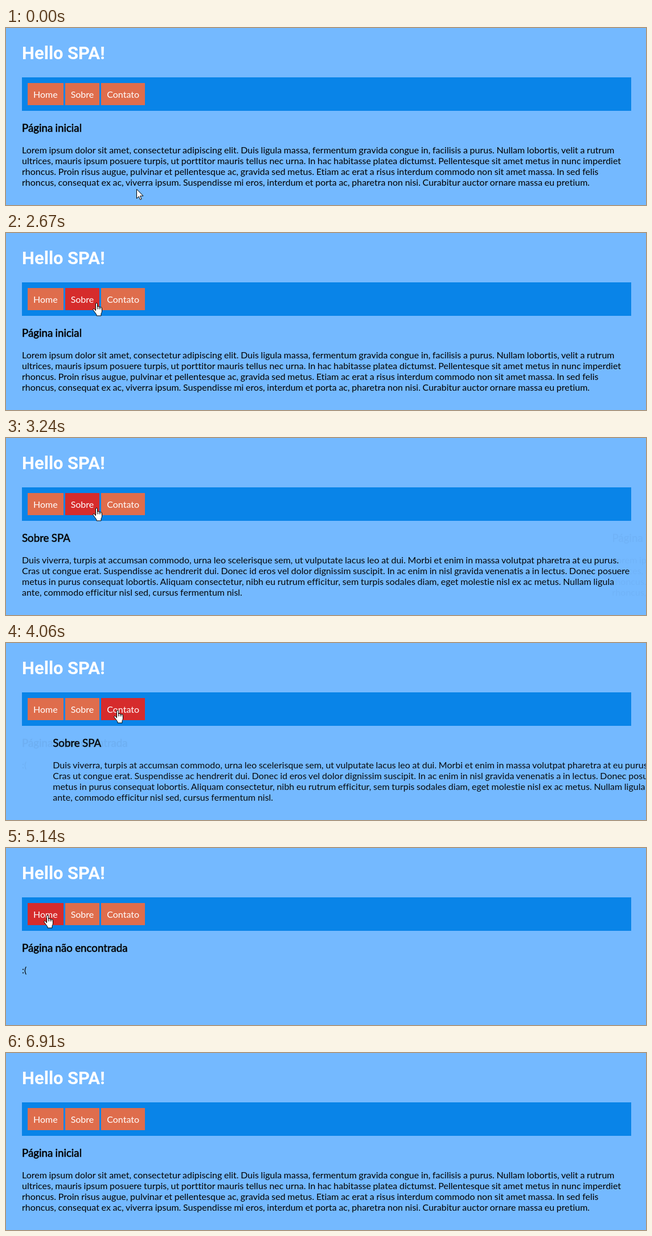
Animation of 1124 by 312 pixels, one loop 6.94 s. Source, as an HTML page:

```html
<!DOCTYPE html>
<html lang="pt-BR">
<head>
<meta charset="utf-8">
<title>Hello SPA!</title>
<style>
  :root { --loop: 6940ms; --link: #df6d4c; --hover: #d62c2c; }
  html, body { margin: 0; width: 100%; height: 100%; overflow: hidden; }
  body {
    position: relative; background: #74b9ff; color: #000;
    font: 16px Lato, sans-serif; font-variant-ligatures: none; word-spacing: -.027em;
  }

  h1 {
    position: absolute; left: 28px; top: 24px; margin: 0;
    color: #fff; font: 700 31px/41px Roboto, sans-serif; white-space: nowrap;
  }

  nav {
    position: absolute; left: 28px; top: 87px; width: 1070px; height: 59px;
    display: flex; gap: 3px; box-sizing: border-box; padding: 10px;
    background: #0984e8; white-space: nowrap;
  }
  nav span {
    padding: 10px; line-height: 19px; color: #fff;
    background: var(--link); animation: var(--loop) linear infinite;
  }
  .home { animation-name: home; }
  .about { animation-name: about; }
  .contact { animation-name: contact; }

  section {
    position: absolute; left: 28px; top: 146px; white-space: nowrap;
    animation: var(--loop) ease infinite;
  }
  .wide { width: 1070px; }
  #start { animation-name: start; }
  #info { animation-name: info; }
  #missing { animation-name: missing; }
  h3 { margin: 18.72px 0; font-size: 18.72px; font-weight: 400; -webkit-text-stroke: .55px; }
  p { margin: 0; line-height: 19px; }

  #cursor {
    position: absolute; left: 0; top: 0; width: 24px; height: 24px; overflow: visible;
    fill: #fff; stroke: #000; stroke-linejoin: round; stroke-linecap: round;
    animation: move var(--loop) ease-in-out infinite;
  }
  #arrow { animation: arrow var(--loop) step-end infinite; }
  #hand { animation: hand var(--loop) step-end infinite; }

  /* Pages: the old one slides out by its own width, the new one fades in */
  @keyframes start {
    0%, 38.876% { opacity: 1; transform: none; }
    48.963% { opacity: 0; transform: translateX(100%); }
    48.964%, 87.363% { opacity: 0; transform: none; }
    97.45%, 100% { opacity: 1; transform: none; }
  }
  @keyframes info {
    0%, 38.876% { opacity: 0; transform: none; }
    48.963%, 57.839% { opacity: 1; transform: none; }
    67.925%, 100% { opacity: 0; transform: translateX(100%); }
  }
  @keyframes missing {
    0%, 57.839% { opacity: 0; transform: none; }
    67.925%, 87.363% { opacity: 1; transform: none; }
    97.45%, 100% { opacity: 0; transform: translateX(100%); }
  }

  /* Menu hover */
  @keyframes home {
    0%, 17.867%, 28.818%, 71.182%, 97.406%, 100% { background: var(--link); }
    20.749%, 25.937%, 74.063%, 94.524% { background: var(--hover); }
  }
  @keyframes about {
    0%, 26.153%, 52.522%, 69.597%, 73%, 100% { background: var(--link); }
    29.035%, 49.64% { background: var(--hover); }
    71% { background: #db4d3c; }
  }
  @keyframes contact {
    0%, 49.784%, 72.262%, 100% { background: var(--link); }
    52.666%, 69.38% { background: var(--hover); }
  }

  /* Pointer */
  @keyframes move {
    0%, 7.637% { transform: translate(229px, 284px); }
    17.651% { transform: translate(98px, 137px); animation-timing-function: ease-out; }
    20.893%, 23.991% { transform: translate(84px, 124px); animation-timing-function: ease-in; }
    25.648% { transform: translate(99px, 134px); animation-timing-function: ease-out; }
    29.395%, 48.631% { transform: translate(158px, 123px); }
    51.873%, 67.795% { transform: translate(195px, 118px); }
    73.847%, 91.931% { transform: translate(72px, 118px); }
    98.703%, 100% { transform: translate(110px, 290px); }
  }
  @keyframes arrow {
    0% { visibility: visible; }
    17.75% { visibility: hidden; }
    94.524% { visibility: visible; }
    99.424%, 100% { visibility: hidden; }
  }
  @keyframes hand {
    0% { visibility: hidden; }
    17.75% { visibility: visible; }
    94.524%, 100% { visibility: hidden; }
  }
</style>
</head>
<body>
  <h1>Hello SPA!</h1>
  <nav>
    <span class="home">Home</span>
    <span class="about">Sobre</span>
    <span class="contact">Contato</span>
  </nav>

  <section id="missing">
    <h3>Página não encontrada</h3>
    <p>:(</p>
  </section>
  <section id="info" class="wide">
    <h3>Sobre SPA</h3>
    <p>Duis viverra, turpis at accumsan commodo, urna leo scelerisque sem, ut vulputate lacus leo at dui. Morbi et enim in massa volutpat pharetra at eu purus.<br>
    Cras ut congue erat. Suspendisse ac hendrerit dui. Donec id eros vel dolor dignissim suscipit. In ac enim in nisl gravida venenatis a in lectus. Donec posuere<br>
    metus in purus consequat lobortis. Aliquam consectetur, nibh eu rutrum efficitur, sem turpis sodales diam, eget molestie nisl ex ac metus. Nullam ligula<br>
    ante, commodo efficitur nisl sed, cursus fermentum nisl.</p>
  </section>
  <section id="start" class="wide">
    <h3>Página inicial</h3>
    <p>Lorem ipsum dolor sit amet, consectetur adipiscing elit. Duis ligula massa, fermentum gravida congue in, facilisis a purus. Nullam lobortis, velit a rutrum<br>
    ultrices, mauris ipsum posuere turpis, ut porttitor mauris tellus nec urna. In hac habitasse platea dictumst. Pellentesque sit amet metus in nunc imperdiet<br>
    rhoncus. Proin risus augue, pulvinar et pellentesque ac, gravida sed metus. Etiam ac erat a risus interdum commodo non sit amet massa. In sed felis<br>
    rhoncus, consequat ex ac, viverra ipsum. Suspendisse mi eros, interdum et porta ac, pharetra non nisi. Curabitur auctor ornare massa eu pretium.</p>
  </section>

  <svg id="cursor" viewBox="0 0 24 24">
    <path id="arrow" d="M.5 .5V16.5L4.2 13 6.6 18.6 9 17.5 6.6 12H11.7Z"/>
    <g id="hand" transform="translate(-6 0)">
      <path d="M5.5 13.5V2a1.5 1.5 0 0 1 3 0V7.5a1.5 1.4 0 0 1 3 .4a1.4 1.4 0 0 1 2.6 .6a1.3 1.3 0 0 1 2.4 .8V15c0 2-1.5 3-1.5 5v2.9H7v-2C5 18 3 15.5 1 12.6c-1-1.6 1.2-2.7 2.4-1.3Z"/>
      <path fill="none" d="M8.5 7.5v3.5M11.5 8v3M14.1 8.5v2.5"/>
    </g>
  </svg>
</body>
</html>
```
